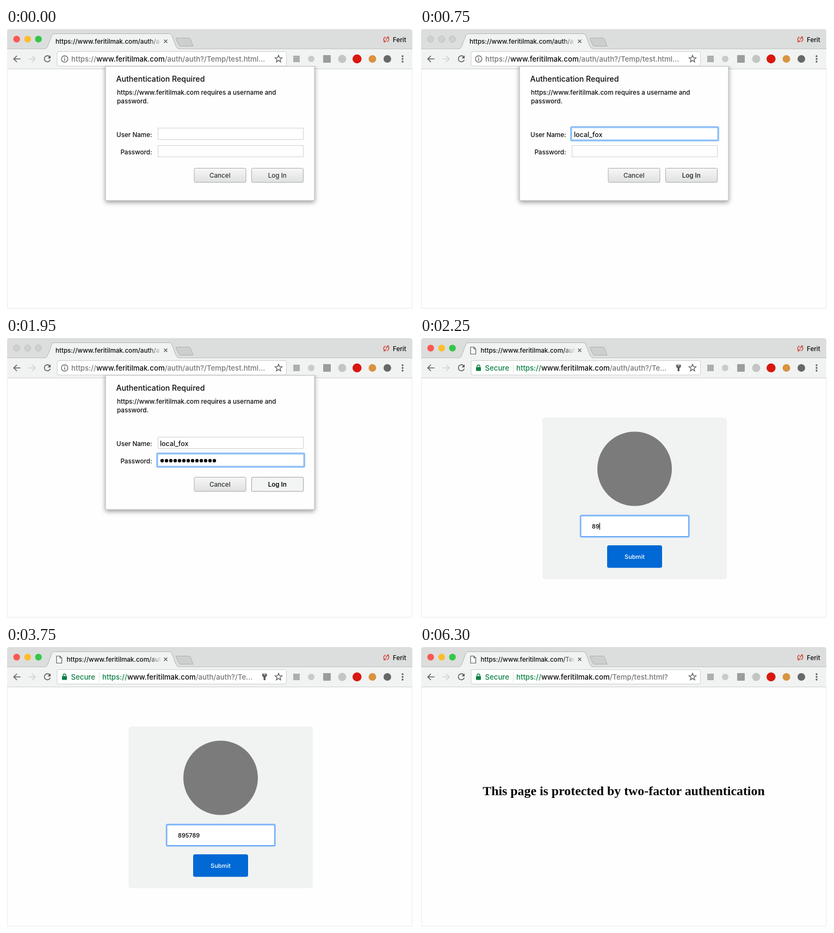
Recreate the animation shown at these times as an HTML page. Size 750 by 518 pixels, loop 7.5 s.

```html
<!DOCTYPE html>
<html lang="en">
<head>
<meta charset="utf-8">
<title>Two-factor login</title>
<style>
  html, body { margin: 0; width: 100%; height: 100%; overflow: hidden; background: #fff; }
  svg { display: block; width: 750px; height: 518px; }
  text { font: 450 11.65px Inter, Roboto, sans-serif; fill: #0c0c0c; white-space: pre; }
  .url { font-size: 13.2px; fill: #747675; }
  .tab { fill: url(#fade); }
  .host { fill: #0c0c0c; }
  .safe { fill: #0b8043; }
  .mid { text-anchor: middle; }
  .soft { fill: #333534; }
  .bold { font-weight: 600; }
  .line { fill: none; stroke: #5b5d5c; stroke-width: 1.6; }
  .field { fill: #fff; stroke: #cfd1d0; }
  .ring { fill: #fff; stroke: #90c0f8; stroke-width: 3.5; }
  .btn { fill: url(#btn); stroke: #a9abaa; }
  .code { font-size: 10.95px; font-weight: 500; fill: #000; }
  .submit { font-size: 11px; font-weight: 550; fill: #fff; }
  .head { font: bold 23.85px "Liberation Serif", "Times New Roman", serif; fill: #050505; }
</style>
</head>
<body>
<svg viewBox="0 0 750 518" xmlns="http://www.w3.org/2000/svg">
  <defs>
    <linearGradient id="btn" x2="0" y2="1">
      <stop stop-color="#f6f7f6"/><stop offset="1" stop-color="#dfe1e0"/>
    </linearGradient>
    <linearGradient id="fade" gradientUnits="userSpaceOnUse" x1="262" x2="286" y1="0" y2="0">
      <stop stop-color="#0c0c0c"/><stop offset="1" stop-color="#0c0c0c" stop-opacity="0"/>
    </linearGradient>
    <filter id="shadow" x="-10%" y="-10%" width="120%" height="125%">
      <feDropShadow dx="0" dy="3" stdDeviation="4" flood-color="#000" flood-opacity=".4"/>
    </filter>
    <clipPath id="below"><rect x="160" y="70" width="430" height="280"/></clipPath>
  </defs>

  <!-- window -->
  <path d="M2 517V7q0-5 5-5H742q5 0 5 5V517Z" fill="#fdfefd"/>
  <path d="M2 39V7q0-5 5-5H742q5 0 5 5V39Z" fill="#dcdedd"/>
  <path d="M2 38.500H747" stroke="#bfc1c0"/>
  <rect x="2" y="39" width="745" height="36" fill="#f1f3f2"/>
  <path d="M2 75.500H747" stroke="#d0d2d1"/>
  <path d="M2.500 76V516.500H746.500V76" fill="none" stroke="#e9ebea"/>

  <!-- tabs -->
  <path d="M71 39Q75 38 77 33L84 14Q85.500 10.500 89 10.500H300Q303.500 10.500 305 14L312 33Q314 38 318 39Z" fill="#f1f3f2"/>
  <path d="M71 38.500Q75 38 77 33L84 14Q85.500 10.500 89 10.500H300Q303.500 10.500 305 14L312 33Q314 38 318 38.500" fill="none" stroke="#b3b5b4"/>
  <path d="M313.500 18.500H336Q338 18.500 339 20.500L344 33.500H321Q318.500 33.500 317.500 31L312.500 20Q312 18.500 313.500 18.500Z" fill="#cdcfce" stroke="#adafae"/>
  <path d="M290.500 21.500l6 6m0-6l-6 6" class="line" style="stroke-width:1.4"/>

  <g data-on="03456">
    <circle cx="19.600" cy="20.500" r="6.200" fill="#fc5753"/>
    <circle cx="39.800" cy="20.500" r="6.200" fill="#fdbc2e"/>
    <circle cx="59.600" cy="20.500" r="6.200" fill="#33c748"/>
  </g>
  <g data-on="12" fill="#cfd1d0" stroke="#bcbebd">
    <circle cx="19.600" cy="20.500" r="5.800"/>
    <circle cx="39.800" cy="20.500" r="5.800"/>
    <circle cx="59.600" cy="20.500" r="5.800"/>
  </g>

  <text data-on="012" class="tab" x="91" y="28.500">https://www.feritilmak.com/auth/a</text>
  <path data-on="3456" d="M93 18.500H99L102.500 22V31.500H93ZM99 18.500V22H102.500" fill="#fff" stroke="#5b5d5c" stroke-width="1.200"/>
  <text data-on="345" class="tab" x="111.500" y="28.500">https://www.feritilmak.com/aut</text>
  <text data-on="6" class="tab" x="111.500" y="28.500">https://www.feritilmak.com/Tem</text>

  <!-- profile -->
  <g fill="none" stroke="#d23f31" stroke-width="1.500">
    <path d="M697.500 16.500A5 5 0 0 0 696 25M700.500 25.500A5 5 0 0 0 702 17"/>
    <path d="M694 25.500H697V22.500M704 16.500H701V19.500M699 18V22M699 23.200V24.700" stroke-width="1.300"/>
  </g>
  <text x="711" y="25.500" style="font-weight:500">Ferit</text>

  <!-- toolbar -->
  <path d="M26.500 57H14.500M20 51.300L14.300 57L20 62.700" class="line"/>
  <path d="M41.500 57H53.500M48 51.300L53.700 57L48 62.700" class="line" style="stroke:#d0d2d1"/>
  <path d="M80.300 53A5.600 5.600 0 1 0 81.400 58.500" class="line"/>
  <path d="M82 50.500V56H76.500Z" fill="#5b5d5c"/>
  <rect x="94" y="43.500" width="421.500" height="26.500" rx="3" fill="#fff" stroke="#cccecd"/>
  <path d="M501 50.200L502.700 54.600L507.500 54.900L503.800 57.900L505 62.500L501 59.900L497 62.500L498.200 57.900L494.500 54.900L499.300 54.600Z" class="line" style="stroke-width:1.300"/>

  <rect x="528" y="51" width="12" height="12" fill="#adafae"/>
  <circle cx="561" cy="57" r="6" fill="#c9cbca"/>
  <rect x="583" y="50" width="14" height="14" rx="1" fill="#9b9d9c"/>
  <circle cx="618" cy="57" r="7.500" fill="#c3c5c4"/>
  <circle cx="645.300" cy="57" r="8.300" fill="#d8170f"/>
  <circle cx="673.500" cy="57" r="7" fill="#d9933f"/>
  <circle cx="701" cy="57" r="7" fill="#666867"/>
  <g fill="#5b5d5c">
    <circle cx="729" cy="52" r="1.700"/><circle cx="729" cy="57" r="1.700"/><circle cx="729" cy="62" r="1.700"/>
  </g>

  <!-- address -->
  <g data-on="012">
    <circle cx="107.800" cy="57" r="5.900" class="line" style="stroke-width:1.300"/>
    <path d="M107.800 56V60.500M107.800 53.300V54.800" class="line" style="stroke-width:1.400"/>
    <text class="url" x="120" y="62">https://<tspan class="host">www.feritilmak.com</tspan>/auth/auth?/Temp/test.html...</text>
  </g>
  <g data-on="3456">
    <rect x="103" y="55.500" width="9" height="7" rx="1" fill="#0b8043"/>
    <path d="M105 56V54a2.500 2.500 0 0 1 5 0V56" fill="none" stroke="#0b8043" stroke-width="1.300"/>
    <text class="url safe" x="119.500" y="62">Secure</text>
    <path d="M171.500 48V66" stroke="#dcdedd"/>
  </g>
  <g data-on="345">
    <text class="url" x="177" y="62"><tspan class="safe">https://</tspan><tspan class="host">www.feritilmak.com</tspan>/auth/auth?/Te...</text>
    <path d="M471 51H479.500V55.500L477 57.500V63H473.500V57.500L471 55.500ZM473.500 52.300V53.500H477V52.300Z" fill="#5b5d5c" fill-rule="evenodd"/>
  </g>
  <text data-on="6" class="url" x="177" y="62"><tspan class="safe">https://</tspan><tspan class="host">www.feritilmak.com</tspan>/Temp/test.html?</text>

  <!-- login dialog -->
  <g data-on="012">
    <g clip-path="url(#below)">
      <rect x="183" y="68" width="384" height="250" rx="2" fill="#fdfefd" stroke="#b4b6b5" filter="url(#shadow)"/>
      <path d="M183 70.500H567" stroke="#b4b6b5"/>
    </g>
    <text x="202.500" y="99.300" style="font-size:14.150px">Authentication Required</text>
    <text x="204" y="123.300">https://www.feritilmak.com requires a username and</text>
    <text x="204" y="139.300">password.</text>
    <text x="268.500" y="201" text-anchor="end">User Name:</text>
    <text x="268.500" y="233" text-anchor="end">Password:</text>
    <rect class="field" x="279.500" y="184.500" width="267" height="21"/>
    <rect class="field" x="279.500" y="216.500" width="267" height="21"/>
    <rect class="btn" x="346" y="258.500" width="95" height="26" rx="2"/>
    <rect class="btn" x="451.500" y="258.500" width="95" height="26" rx="2"/>
    <text class="mid soft" x="393.300" y="276">Cancel</text>
  </g>
  <text data-on="0" class="mid soft" x="498.800" y="276">Log In</text>
  <text data-on="1" class="mid soft bold" x="498.800" y="276">Log In</text>
  <g data-on="2">
    <rect x="451.500" y="258.500" width="95" height="26" rx="2" fill="#f3f5f4" stroke="#a0a2a1"/>
    <text class="mid bold" x="498.800" y="276">Log In</text>
  </g>
  <rect data-on="1" class="ring" x="277.750" y="182.750" width="270.500" height="24.500" rx="1.500"/>
  <text data-on="12" x="283" y="201" style="font-size:12.400px">local_fox</text>
  <g data-on="2">
    <rect class="ring" x="277.750" y="214.750" width="270.500" height="24.500" rx="1.500"/>
    <path d="M287 228H383.500" stroke="#0a0a0a" stroke-width="6.400" stroke-linecap="round" stroke-dasharray="0 8"/>
  </g>

  <!-- second step -->
  <g data-on="345">
    <rect x="225" y="148.500" width="339" height="298" rx="5" fill="#f1f3f2"/>
    <circle cx="394.500" cy="243" r="68.500" fill="#7b7b7b"/>
    <rect x="295" y="329" width="199.500" height="39.500" rx="2" fill="#fff" stroke="#b5d5fb" stroke-width="3.400"/>
    <rect x="295.500" y="329.500" width="198.500" height="38.500" rx="1.500" fill="#fff" stroke="#68a7f5" stroke-width="1.800"/>
    <text id="code" class="code" x="316" y="353.300"></text>
    <rect id="caret" y="342.500" width="1.100" height="13" fill="#000"/>
    <rect x="344" y="384" width="101" height="41.500" rx="3.500" fill="#0069d6"/>
    <text class="mid submit" x="394.500" y="409">Submit</text>
  </g>

  <text data-on="6" class="head mid" x="374.500" y="274.700">This page is protected by two-factor authentication</text>
</svg>
<script>
  const STEP = 750, LOOP = 7500, LAST = 6;
  const typed = { 3: 2, 4: 4, 5: 6 };
  const parts = document.querySelectorAll("[data-on]");
  const code = document.getElementById("code");
  const caret = document.getElementById("caret");
  const start = performance.now();
  let shown = -1;

  function show(step) {
    for (const el of parts) el.style.display = el.dataset.on.includes(step) ? "" : "none";
    if (!typed[step]) return;
    code.textContent = "895789".slice(0, typed[step]);
    caret.setAttribute("x", 316 + code.getComputedTextLength());
    caret.style.display = step < 5 ? "" : "none";
  }

  function tick() {
    const t = (performance.now() - start) % LOOP;
    const step = Math.min(LAST, Math.floor(t / STEP));
    if (step !== shown) show(shown = step);
    requestAnimationFrame(tick);
  }
  tick();
</script>
</body>
</html>
```
